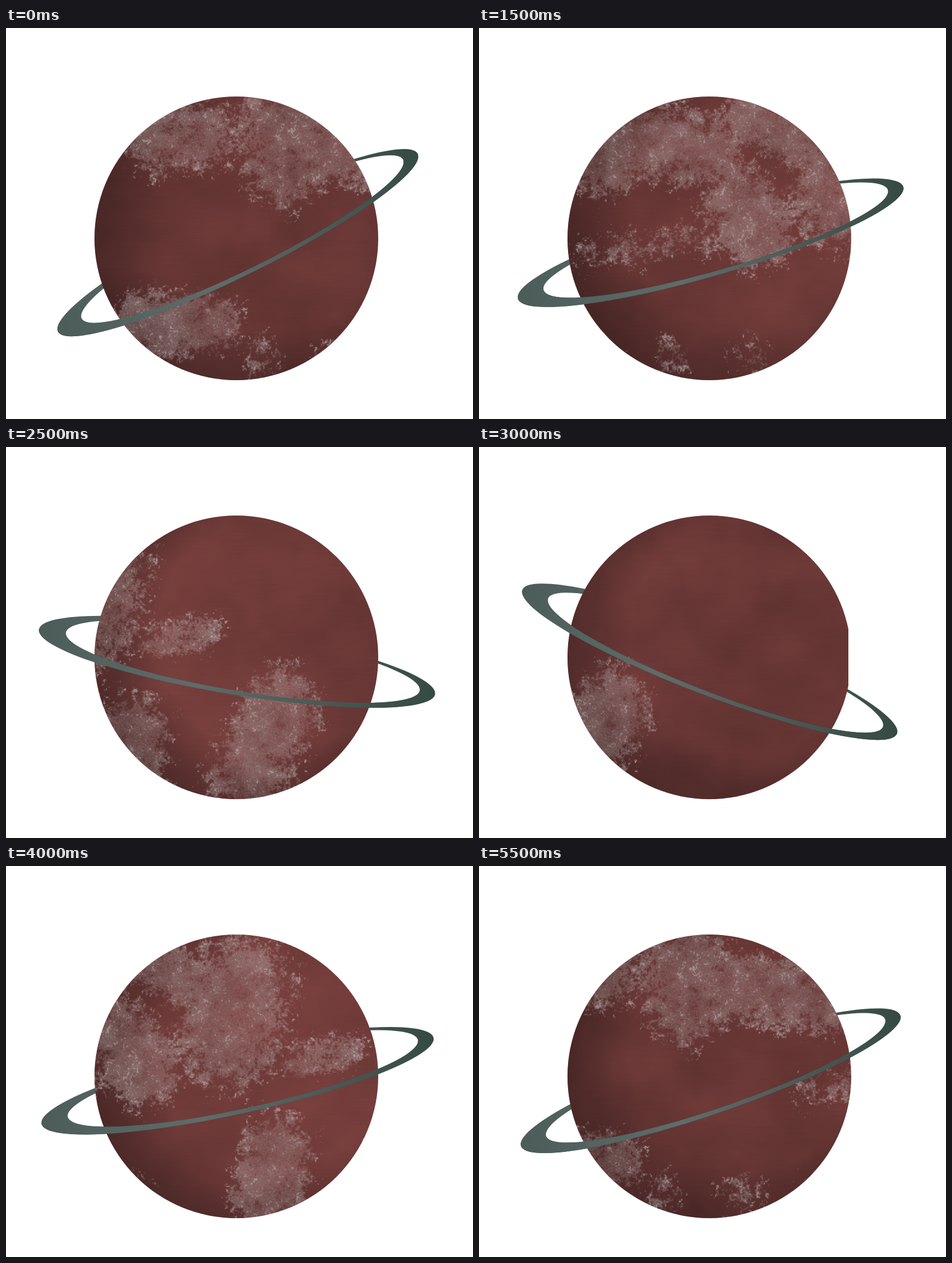
Write an HTML page with a canvas that moves like this. It is 818 by 685 pixels and loops after 6000 ms.

```html
<!DOCTYPE html>
<html lang="en">
<head>
<meta charset="utf-8">
<title>Ringed planet</title>
<style>
  html, body { margin: 0; width: 100%; height: 100%; overflow: hidden; background: #fff; }
  canvas { display: block; }
</style>
</head>
<body>
<canvas id="stage" width="818" height="685"></canvas>
<script>
const ctx = document.getElementById('stage').getContext('2d');
const STEP = 500, STEPS = 12;
const planet = { x: 403.5, y: 368.5, r: 248.5 };
const hub = { x: 405, y: 374 };
const LEFT = 155, TOP = 120, MAP_W = 1750, MAP_H = 498;

// The surface gathers speed over the first two steps, then turns evenly.
const scroll = k => 250 * k - 242 * (1 - Math.exp(-0.73 * k ** 1.75));
// Ring poses of the half loop, in degrees; the other half runs backwards.
const tilt = [-26.3, -19, -11.1, -16.2, -12.4, 9.3, 21];

const clamp = v => Math.max(0, Math.min(1, v));

// Broad brush strokes on the unrolled surface: from, to, radius, weight
const strokes = [];
function stroke(x, y, x2, y2, r, weight = 1) {
  const dx = x2 - x, dy = y2 - y;
  strokes.push({ x, y, dx, dy, len2: dx * dx + dy * dy || 1, r, weight });
}
stroke(265, 195, 345, 185, 66, 0.9);
stroke(482, 172, 490, 232, 86);
stroke(565, 210, 730, 232, 64);
stroke(785, 195, 905, 212, 70);
stroke(965, 310, 995, 350, 74);
stroke(985, 155, 1075, 205, 52);
stroke(1165, 215, 1145, 300, 96);
stroke(235, 520, 350, 520, 62);
stroke(1232, 500, 1215, 575, 68);
stroke(1490, 455, 1430, 580, 72);
stroke(1270, 345, 1355, 322, 36, 0.75);
stroke(710, 392, 900, 365, 38, 0.55);
for (let x = 450; x < 1000; x += 133) stroke(x, 575, x, 575, 40, 0.6);

function coverage(x, y) {
  let best = -1;
  for (const s of strokes) {
    const px = x - s.x, py = y - s.y;
    const t = clamp((px * s.dx + py * s.dy) / s.len2);
    const ex = px - t * s.dx, ey = py - t * s.dy;
    const q = 1 - (ex * ex + ey * ey) / (s.r * s.r);
    best = Math.max(best, s.weight * (q + 0.8) - 0.72);
  }
  return best;
}

let seed = 7;
function random() {
  seed = (seed * 1664525 + 1013904223) >>> 0;
  return seed / 4294967296;
}
const lattice = Float32Array.from({ length: 65536 }, random);

// Smooth value noise, centred on zero.
function noise(x, y) {
  const ix = Math.floor(x), iy = Math.floor(y);
  let fx = x - ix, fy = y - iy;
  fx *= fx * (3 - 2 * fx);
  fy *= fy * (3 - 2 * fy);
  const x0 = ix & 255, x1 = (ix + 1) & 255;
  const r0 = (iy & 255) << 8, r1 = ((iy + 1) & 255) << 8;
  const a = lattice[r0 + x0], b = lattice[r0 + x1];
  const c = lattice[r1 + x0], d = lattice[r1 + x1];
  const top = a + (b - a) * fx;
  return top + (c + (d - c) * fx - top) * fy - 0.5;
}

function paintMap(pixel) {
  const map = document.createElement('canvas');
  map.width = MAP_W;
  map.height = MAP_H;
  const mctx = map.getContext('2d');
  const img = mctx.createImageData(MAP_W, MAP_H);
  for (let j = 0, i = 0; j < MAP_H; j++) {
    for (let k = 0; k < MAP_W; k++, i += 4) pixel(img.data, i, k + LEFT, j + TOP);
  }
  mctx.putImageData(img, 0, 0);
  return map;
}

function soil(px, i, x, y) {
  const tone = 102 + 13 * Math.exp(-(((x - 1230) / 330) ** 2))
    + noise(x / 85, y / 70) * 15 + noise(x / 24, y / 22) * 5
    + noise(x / 30, y / 1.5) * 3;
  px[i] = tone;
  px[i + 1] = tone * 0.53;
  px[i + 2] = tone * 0.51;
  px[i + 3] = 255;
}

function frost(px, i, x, y) {
  const level = coverage(x, y);
  if (level < -0.9) return;
  const broad = noise(x / 60, y / 55);
  const mid = noise(x / 24 + 40, y / 22);
  const rough = noise(x / 9, y / 9 + 20);
  const fine = noise(x / 4 + 70, y / 4);
  const grain = noise(x / 2.2, y / 2.2 + 90);
  const edge = mid * 0.75 + rough * 0.8 + fine * 0.8 + grain * 0.6;
  const amount = clamp((level + edge) * 1.9);
  const spark = clamp((fine * 0.7 + grain * 0.8 + rough * 0.5 + mid * 0.3 - 0.34) * 4);
  const veil = 0.25 + broad * 0.13 + mid * 0.2 + rough * 0.1 + grain * 0.14 + spark * 0.25;
  px[i] = 190;
  px[i + 1] = px[i + 2] = 184;
  px[i + 3] = 255 * amount * clamp(veil);
}

const soilMap = paintMap(soil);
const frostMap = paintMap(frost);

const ring = new Path2D();
ring.ellipse(0, 2.3, 351.5, 57.7, 0, 0, Math.PI * 2);
ring.closePath();
ring.moveTo(324, 0.3);
ring.ellipse(10, 0.3, 314, 52.3, 0, 0, Math.PI * 2);

const ringFill = ctx.createLinearGradient(-352, 0, 352, 0);
ringFill.addColorStop(0, '#4b5c59');
ringFill.addColorStop(0.4, '#5d6d6a');
ringFill.addColorStop(1, '#364a44');

const shade = ctx.createRadialGradient(470, 330, 205, 470, 330, 335);
shade.addColorStop(0, 'rgba(26,16,16,0)');
shade.addColorStop(0.5, 'rgba(26,16,16,.24)');
shade.addColorStop(1, 'rgba(26,16,16,.42)');

function drawRing(angle, frontOnly) {
  ctx.save();
  ctx.translate(hub.x, hub.y);
  ctx.rotate(angle * Math.PI / 180);
  if (frontOnly) {
    ctx.beginPath();
    ctx.rect(-400, 2, 800, 100);
    ctx.clip();
  }
  ctx.fillStyle = ringFill;
  ctx.fill(ring, 'evenodd');
  ctx.restore();
}

function drawPlanet(shift) {
  const x = Math.round(LEFT - shift);
  ctx.save();
  ctx.beginPath();
  ctx.arc(planet.x, planet.y, planet.r, 0, Math.PI * 2);
  ctx.clip();
  ctx.drawImage(soilMap, x, TOP);
  ctx.fillStyle = shade;
  ctx.fillRect(LEFT, TOP, 500, 500);
  ctx.drawImage(frostMap, x, TOP);
  ctx.restore();
}

function draw(ms) {
  const step = Math.floor(ms / STEP) % STEPS;
  const k = Math.min(step, STEPS - step);
  ctx.fillStyle = '#fff';
  ctx.fillRect(0, 0, 818, 685);
  drawRing(tilt[k], false);
  drawPlanet(scroll(k));
  drawRing(tilt[k], true);
}

let start = null;
function tick(now) {
  if (start === null) start = now;
  draw(now - start);
  requestAnimationFrame(tick);
}
draw(0);
requestAnimationFrame(tick);
</script>
</body>
</html>
```
